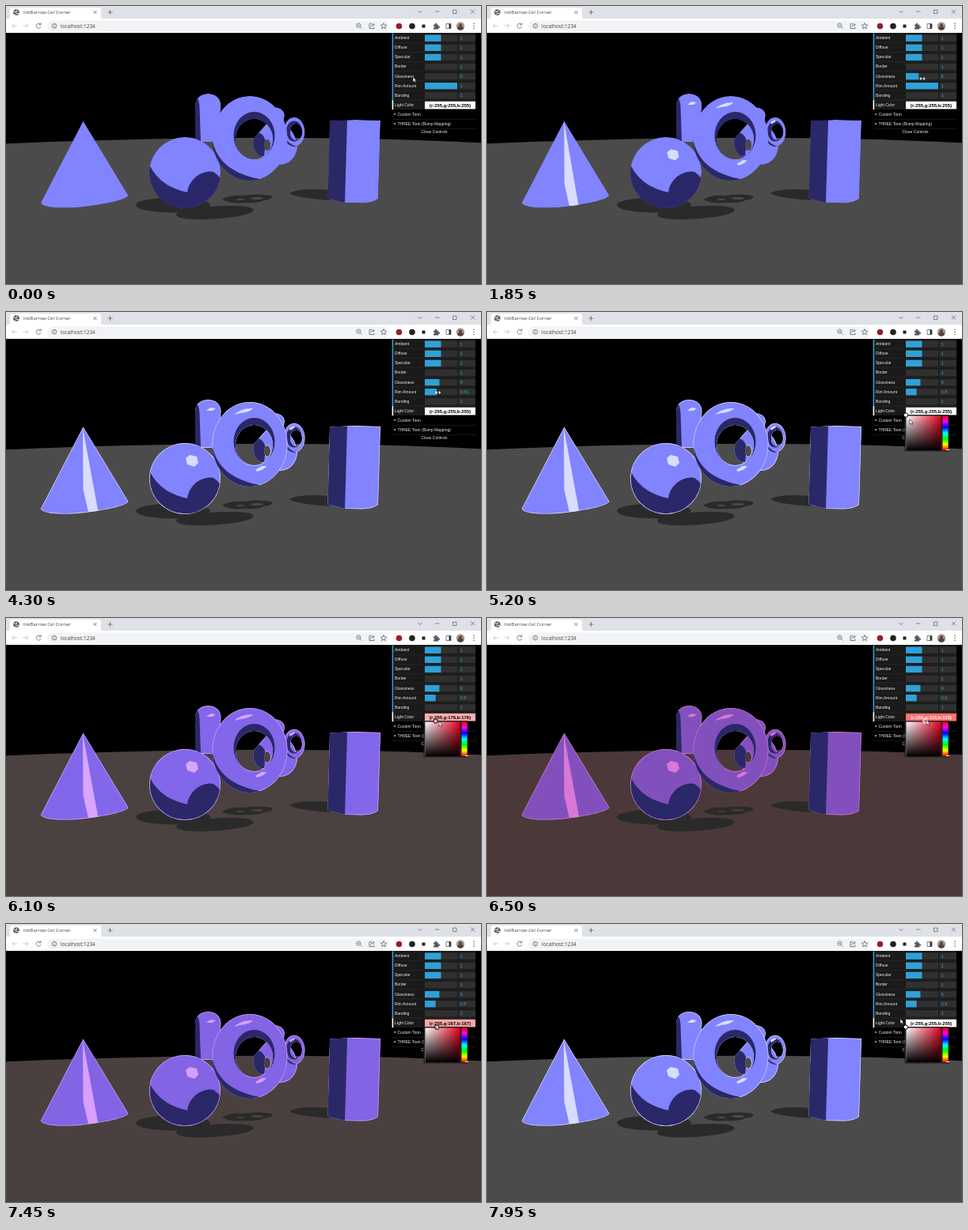
Write an HTML page that moves like this. It is 600 by 352 pixels and loops after 8000 ms.

```html
<!DOCTYPE html>
<html lang="en">
<head>
<meta charset="utf-8">
<title>Cel shading controls</title>
<style>
  html, body { margin: 0; width: 100%; height: 100%; overflow: hidden; background: #000; }
  svg { display: block; width: 600px; height: 352px; }
  text { white-space: pre; }
  .chrome { font-family: "Open Sans", sans-serif; fill: #404347; }
  .icon { fill: none; stroke: #5f6368; stroke-width: .8; }
  .icon.faint { stroke: #b9bbbe; }
  .icon.thin { stroke: #444; stroke-width: .6; }
  .panel { font: 5px "Liberation Sans", Arial, sans-serif; fill: #eee; }
  .value { fill: #2fa1d6; font-size: 5.8px; }
  .lit { fill: var(--lit); fill-rule: evenodd; }
  .dark { fill: #2a2868; fill-rule: evenodd; }
  .shine { fill: var(--shine); transform-box: fill-box; transform-origin: center; transform: scale(var(--size)); }
  .shine.wedge { transform-origin: 30% 0; transform: scale(var(--size), 1); }
  .rim { fill: none; stroke: var(--shine); stroke-width: var(--rim); }
  .floor { fill: var(--floor); }
  .shadow { fill: #2a2a2a; fill-rule: evenodd; }
</style>
</head>
<body>
<svg id="stage" viewBox="0 0 600 352">
  <defs>
    <linearGradient id="saturation"><stop stop-color="#fff"/><stop offset="1" stop-color="#e80020"/></linearGradient>
    <linearGradient id="darkness" x2="0" y2="1"><stop stop-color="#000" stop-opacity="0"/><stop offset="1"/></linearGradient>
    <linearGradient id="hue" x2="0" y2="1"></linearGradient>
  </defs>

  <rect width="600" height="352"/>
  <path class="floor" d="M0 174.200Q330 160 600 173.200V352H0Z"/>
  <g id="shadows"></g>
  <g id="solids"></g>

  <g class="chrome">
    <rect width="600" height="17" fill="#dee1e6"/>
    <path d="M2 17Q5 17 5 13V5Q5 2 8 2H117Q120 2 120 5V13Q120 17 123 17Z" fill="#fff"/>
    <rect y="16" width="600" height="18" fill="#fff"/>
    <circle cx="13" cy="8" r="3.8" fill="#55595e"/>
    <path d="M10 6.700l3 1 1-2.500M11.500 10.700l2-1.500 2.500.5" fill="none" stroke="#fff" stroke-width="1"/>
    <text x="22" y="10.200" font-size="6">InkBarrow Cel Corner</text>
    <path class="icon" d="M110.500 6l4 4m0-4l-4 4M128.500 8h6m-3-3v6"/>
    <path class="icon thin" d="M520.500 6l2.500 2.500 2.500-2.500M542 7h5.500M564.500 5h4.500v4.500h-4.500zM587 4.500l5 5m0-5l-5 5"/>
    <rect x="52" y="18.500" width="432" height="14" rx="7" fill="#f1f3f4"/>
    <path class="icon faint" d="M14 25H8m2.500-2.500l-2.500 2.500 2.500 2.500M22 25h6m-2.500-2.500l2.500 2.500-2.500 2.500"/>
    <path class="icon" d="M43.500 23.200a3 3 0 1 0 .5 3M44 21.200v2.600h-2.600"/>
    <circle class="icon" cx="61" cy="25.200" r="2.800"/><path class="icon" d="M61 24.800v2m0-3.800v.8"/>
    <text x="69" y="27.600" font-size="6.500">localhost:1234</text>
    <path class="icon" d="M447.600 26.500l2 2M444 24.500h2.600M462 22.500h-3v6h6v-2M460.500 26.500q.5-3 4.500-3m-1.800-2l2 2-2 2M477 21.600l1.100 2.400 2.600.2-2 1.800.6 2.600-2.300-1.400-2.300 1.400.6-2.600-2-1.800 2.600-.2z"/>
    <circle class="icon" cx="445.300" cy="24.500" r="2.600"/>
    <circle cx="496.500" cy="25.500" r="3.800" fill="#9b1c2c"/>
    <circle cx="513" cy="25.500" r="3.800" fill="#222"/>
    <rect x="525.500" y="23.500" width="4" height="4" fill="#222"/>
    <path d="M540 23.500h2q-.5-2 1-2t1 2h2.200v2.200q2-.5 2 1t-2 1V29.500H540v-2q1.500 0 1.500-1t-1.500-1z" fill="#55595e"/>
    <path class="icon" d="M556 22.500h6v6h-6z"/><path d="M559.500 22.500h2.500v6h-2.500z" fill="#333"/>
    <circle cx="574" cy="25.500" r="5.200" fill="#a89488"/>
    <path d="M570 28.800q0-2.500 2.500-3a2 2 0 1 1 3 0q2.500.5 2.500 3-4 3.700-8 0" fill="#51443f"/>
    <g fill="#55595e"><circle cx="591" cy="22.300" r=".8"/><circle cx="591" cy="25.300" r=".8"/><circle cx="591" cy="28.300" r=".8"/></g>
  </g>

  <g class="panel" id="panel"></g>
  <g id="picker">
    <rect x="527.500" y="130" width="56" height="46.500" fill="#222"/>
    <rect x="529.500" y="131.500" width="44" height="43.500" fill="url(#saturation)"/>
    <rect x="529.500" y="131.500" width="44" height="43.500" fill="url(#darkness)"/>
    <rect x="575.500" y="131.500" width="7" height="43.500" fill="url(#hue)"/>
    <path d="M580 174.500h4" stroke="#fff"/>
    <circle id="knob" cy="130.500" r="2.700" stroke-width="1"/>
  </g>
  <g id="cursor">
    <path id="arrow" d="M0 0V6.200L1.500 4.900 2.600 7.200 3.600 6.700 2.600 4.500H4.500Z" fill="#fff" stroke="#000" stroke-width=".5"/>
    <path id="resize" d="M-3.500 0l2-1.700v3.400zM3.500 0l-2-1.700v3.400zM-1.500 0h3" fill="#fff" stroke="#fff" stroke-width=".4"/>
  </g>
</svg>

<script>
const LOOP = 8000, STEP = 50;
const $ = id => document.getElementById(id);
const ellipse = (cx, cy, rx, ry) =>
  `M${cx - rx} ${cy}a${rx} ${ry} 0 1 0 ${2 * rx} 0a${rx} ${ry} 0 1 0 ${-2 * rx} 0Z`;

$("hue").innerHTML = ["f00", "f0f", "00f", "0ff", "0f0", "ff0", "f00"]
  .map((c, i) => `<stop offset="${i / 6}" stop-color="#${c}"/>`).join("");

$("shadows").innerHTML = [
  ellipse(211, 252, 47, 9.5),
  "M215 264C218 257 250 253 285 253C318 253 318 260 303 264C275 271.500 214 273 215 264Z",
  "M273 245Q282 239 300 240Q318 237 335 240Q340 244 326 246Q318 250 300 249Q285 251 273 245Z" + ellipse(317, 243.5, 8, 1.6) + ellipse(296, 245, 5, 1),
  "M358 237Q370 230 409 233V246Q365 243 358 237Z"
].map(d => `<path class="shadow" d="${d}"/>`).join("");

// Back to front; "edge" is an outline whose rim light also crosses the dark side.
const torusHole = ellipse(313.5, 168.5, 23.5, 25.5);
const ringHole = ellipse(366.5, 159.5, 7.5, 10.5);
const solids = [
  { name: "knot",
    shape: "M338 128Q350 128 352 138L350 150Q367 158 368 180Q364 200 346 201L318 188Q309 176 314 166L330 148Z" + ellipse(330, 176, 4, 7),
    dark: "M312 160Q325 158 328 172L326 190H314Q308 176 312 160ZM347 152L356 153 352 168 347 164Z" },
  { name: "ring",
    shape: ellipse(364, 159.5, 13.5, 18.5) + ringHole,
    dark: ellipse(364, 158.5, 10, 13) + ringHole + "M351 163Q356 176 368 178L358 181 349 172Z",
    shines: ["M358 147l6-3 1 2-6 4z"] },
  { name: "capsule",
    shape: "M239 126C239 106 271.500 106 271.500 126L267 172H239Z",
    dark: "M239 121L242 117Q244 121 244.500 128L246 172H239Z",
    shines: ["M253 125L258 121 265 122 261 125Z"] },
  { name: "sphere",
    shape: ellipse(226, 211, 45, 45),
    dark: "M181 201Q189 217 203 226Q215 233 229 236Q230 225 240 216Q251 208 262 210Q268 214 274 222L262 260H178Z",
    shines: ["M227 185L232 181 241 183 243 191 238 196 229 193Z"],
    edge: ellipse(226, 211, 45, 45) },
  { name: "torus",
    shape: ellipse(308, 167.5, 47.5, 53.5) + torusHole,
    dark: ellipse(313.5, 164, 26, 30) + torusHole + "M260 168C266 196 284 213 325 220L300 225 255 203Z",
    shines: ["M288 130Q298 121 312 122Q308 127 296 128Z", "M315 200L323 195 329 195Q326 200 317 202Z"] },
  { name: "cone",
    shape: "M97.500 145.500L44 249C45 256 75 257 100 254C130 250 152 245 154.500 240Z",
    shines: ["M97 147L97.500 225 104 253 116.500 253Z"], shineClass: "wedge" },
  { name: "prism",
    shape: "M409 145.500L441 144 473 145 470 244Q464 249 450 249.500L428 249 406.500 243.500Z",
    dark: "M409 145L431 145 428 250 406 244Z" }
];
$("solids").innerHTML = solids.map(({ name, shape, dark = "", shines = [], shineClass = "", edge }) => {
  const rim = `<path class="rim" d="${edge || shape}"/>`;
  return `<clipPath id="${name}"><path clip-rule="evenodd" d="${shape}"/></clipPath>
    <g clip-path="url(#${name})"><path class="lit" d="${shape}"/>
    ${edge ? "" : rim}<path class="dark" d="${dark}"/>${edge ? rim : ""}
    ${shines.map(d => `<path class="shine ${shineClass}" d="${d}"/>`).join("")}</g>`;
}).join("");

const sliders = [["Ambient", 1, .5], ["Diffuse", 1, .5], ["Specular", 1, .5], ["Border", 1, 0],
  ["Glossiness", 0, 0], ["Rim Amount", 1, 1], ["Banding", 1, 0]];
const rowY = i => 34.5 + i * 12.1;
const sliderRow = ([label, value, fill], i) => {
  const y = rowY(i);
  return `<path d="M488 ${y + 12}h105" stroke="#2c2c2c" stroke-width=".6"/>
    <rect x="487.600" y="${y}" width="1.600" height="12.100" fill="#2fa1d6"/>
    <text x="491" y="${y + 7.6}">${label}</text>
    <rect x="529" y="${y + 2}" width="41" height="8.400" fill="#303030"/>
    <rect id="fill${i}" x="529" y="${y + 2}" width="${41 * fill}" height="8.400" fill="#2fa1d6"/>
    <rect x="571.500" y="${y + 2}" width="21.500" height="8.400" fill="#303030"/>
    <text class="value" id="value${i}" x="573.500" y="${y + 8.2}">${value}</text>`;
};
$("panel").innerHTML = `<rect x="488" y="34" width="105" height="97.500" fill="#1a1a1a"/>
  <rect x="488" y="131" width="105" height="33" fill="#000"/>
  ${sliders.map(sliderRow).join("")}
  <rect x="487.600" y="119.200" width="1.600" height="12" fill="#fff"/>
  <text x="491" y="127">Light Color</text>
  <rect id="swatch" x="529" y="120.800" width="64" height="9.600"/>
  <text id="swatchText" x="561" y="127.700" text-anchor="middle" font-size="5.900" font-weight="bold"></text>
  <path d="M488 143.400h105M488 155.400h105" stroke="#2c2c2c" stroke-width=".6"/>
  <path d="M490.500 135.700l2 1.300-2 1.300zM490.500 147.800l2 1.300-2 1.300z"/>
  <text x="494.500" y="139">Custom Toon</text>
  <text x="494.500" y="151">THREE Toon (Bump Mapping)</text>
  <text x="541" y="161" text-anchor="middle">Close Controls</text>`;

// Linear interpolation through [time, value] keys.
function track(t, keys) {
  if (t <= keys[0][0]) return keys[0][1];
  for (let i = 1; i < keys.length; i++) {
    const [t0, a] = keys[i - 1], [t1, b] = keys[i];
    if (t <= t1) return a + (b - a) * (t - t0) / (t1 - t0);
  }
  return keys[keys.length - 1][1];
}

const pointer = [[0, 514, 90], [550, 530, 90], [1850, 550, 92], [2450, 548, 91], [3250, 572.5, 102],
  [4400, 543, 102], [4700, 545, 125], [5200, 534, 136], [5400, 530, 132], [6100, 547, 131],
  [7050, 566, 127], [7700, 529, 127], [7950, 522, 120]];
const glossKeys = [[600, 0], [1850, 8], [2400, 9]];
const rimKeys = [[3300, 1], [4350, .8]];
const saturationKeys = [[5400, 0], [6100, .31], [7050, .894], [7700, 0]];

const rgb = channels => `rgb(${channels.map(c => Math.min(255, Math.round(c))).join()})`;

function setSlider(i, value, fraction) {
  $("value" + i).textContent = value;
  $("fill" + i).setAttribute("width", 41 * fraction);
}

function render(t) {
  const gloss = Math.round(track(t, glossKeys));
  const rim = Math.round(track(t, rimKeys) * 100) / 100;
  const saturation = track(t, saturationKeys);
  const tint = Math.round(255 * (1 - saturation));
  const light = [1, tint / 255, tint / 255];
  const shade = (base, gain) => base.map((b, i) => b + gain[i] * light[i]);
  const lit = shade([42, 40, 104], [88, 91, 190]);

  const vars = {
    lit: rgb(lit),
    shine: rgb(shade(lit, [86, 90, 60])),
    floor: rgb(shade([42, 42, 43], [33, 33, 32])),
    size: Math.sqrt(gloss / 9),
    rim: (1 - rim) * 7 + "px"
  };
  for (const name in vars) $("stage").style.setProperty("--" + name, vars[name]);

  setSlider(4, gloss, gloss / 20);
  setSlider(5, rim, (rim - .7) / .3);

  const color = `rgb(255,${tint},${tint})`;
  const contrast = saturation > .5 ? "#fff" : "#000";
  $("swatch").setAttribute("fill", color);
  $("swatchText").textContent = `{r:255,g:${tint},b:${tint}}`;
  $("swatchText").setAttribute("fill", contrast);
  $("picker").style.display = t >= 4800 ? "" : "none";
  $("knob").setAttribute("fill", color);
  $("knob").setAttribute("stroke", contrast);
  $("knob").setAttribute("cx", 529 + 44 * saturation);

  const [x, y] = [1, 2].map(axis => track(t, pointer.map(key => [key[0], key[axis]])));
  const resizing = (t >= 550 && t < 2450) || (t >= 3150 && t < 4450);
  $("cursor").setAttribute("transform", `translate(${x} ${y})`);
  $("arrow").style.display = resizing ? "none" : "";
  $("resize").style.display = resizing ? "" : "none";
}

const start = performance.now();
function frame() {
  const elapsed = (performance.now() - start) % LOOP;
  render(Math.floor(elapsed / STEP) * STEP);
  requestAnimationFrame(frame);
}
frame();
</script>
</body>
</html>
```
